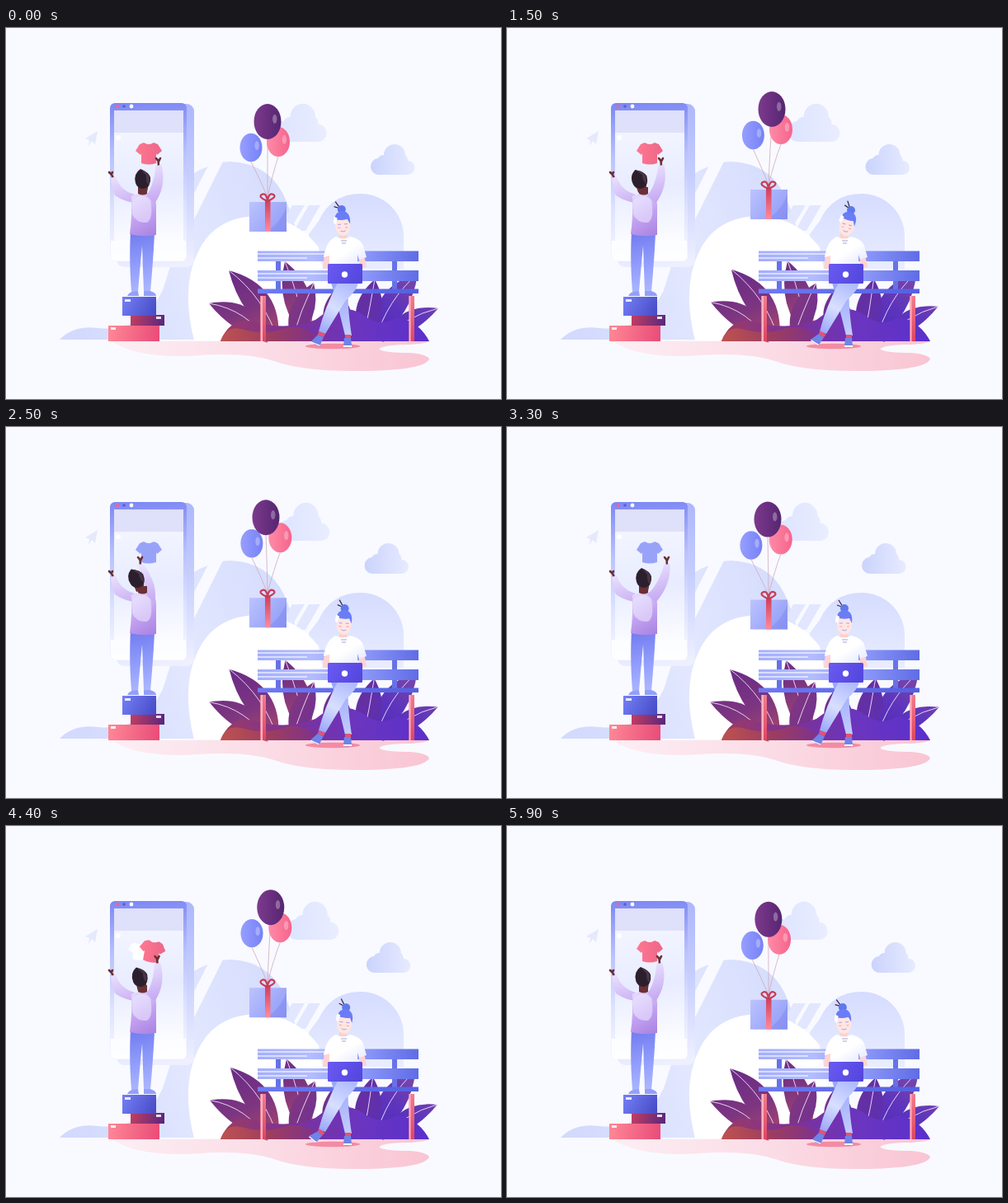
Write an HTML page that moves like this. It is 600 px wide and 450 px high and loops after 6 s.

```html
<!DOCTYPE html>
<html lang="en">
<head>
<meta charset="utf-8">
<title>Online shopping</title>
<style>
html, body { margin: 0; width: 100%; height: 100%; overflow: hidden; background: #f9faff; }
svg { display: block; width: 600px; height: 450px; }
</style>
</head>
<body>
<svg viewBox="0 0 600 450">
<defs id="defs">
  <path id="cloud" d="M10 36a10 10 0 0 1-2-20a8 8 0 0 1 7-4a13 13 0 0 1 26 0q3 2 3 7a8.500 8.500 0 0 1 0 17z"/>
  <path id="tee" d="M-6-13Q0-9 6-13L11-11L16-3L10 2L9 0V12Q0 15-9 12V0L-10 2L-16-3L-11-11z"/>
</defs>

<!-- scenery -->
<path fill="url(#hill)" d="M65 378Q82 360 112 364Q165 370 190 318L216 235V184Q244 163 272 162Q323 164 341 213L350 240L300 300L228 378z"/>
<path fill="#f9faff" d="M245 167L263 162L224 240L217 222z"/>
<path fill="url(#dome)" d="M372 292L367 250L379 234Q394 201 430 201A52 52 0 0 1 482 253V292z"/>
<path fill="#e2e7ff" d="M347 215H362L346 242H331zM367 215H381L363 246H349z"/>
<path fill="#fff" d="M228 379Q212 315 232 273Q252 229 305 228Q350 229 379 266L400 379z"/>
<use id="cloudA" href="#cloud" fill="url(#mistA)"/>
<use id="cloudB" href="#cloud" fill="url(#mistB)"/>
<path fill="#e4e9fd" d="M96 134L111 125L108 141L104 137L100 143L101 136z"/>
<path fill="url(#ground)" d="M128 380H513Q505 384 480 384Q450 386 453 390Q460 394 490 394Q512 396 513 402Q505 416 420 416Q358 416 325 404Q292 393 235 397Q160 402 128 380z"/>

<!-- phone -->
<rect x="134" y="92" width="94" height="198" rx="9" fill="url(#back)"/>
<rect x="126" y="91" width="93" height="192" rx="6" fill="url(#front)"/>
<path fill="#f3f5ff" d="M131 100H215V258H131z"/>
<path fill="url(#screen)" d="M131 127H215V258H131z"/>
<path fill="#dfe0f9" d="M131 100H215V127H131z"/>
<path fill="#fff" d="M127 258H218V276Q218 282 211 282H134Q127 282 127 276z" opacity=".85"/>
<circle cx="135" cy="95" r="2.2" fill="#e56a9b"/><circle cx="143" cy="95" r="1.8" fill="#5a5fd0"/>
<circle cx="152" cy="95" r="2.4" fill="#fff"/><circle cx="136" cy="133" r="3" fill="#fff"/>
<use id="teeGhost" href="#tee" fill="#fff"/>
<use id="teePink" href="#tee" fill="url(#rose)"/>
<use id="teeBlue" href="#tee" fill="#98a3f8"/>

<!-- boxes -->
<path fill="url(#boxMid)" d="M151 348H192V361H151z"/>
<path fill="url(#boxLow)" d="M124 361H186V380H124z"/>
<path fill="url(#boxTop)" d="M141 326H182V349H141z"/>
<path fill="#fff" d="M144 329h7v3h-7zM127 363h6v3h-6zM182 350h6v3h-6z" opacity=".85"/>

<!-- man -->
<path fill="url(#trousers)" d="M151 248H180Q179 275 175 320H167L165 264Q162 295 160 320H152Q149 280 151 248z"/>
<path fill="#93a0fa" d="M147 325Q149 319 160 319L161 325zM167 319H175Q182 321 182 325H167z"/>
<path stroke="#6b3036" stroke-width="2.6" stroke-linecap="round" fill="none" d="M130 182L127 176M127 177L125 175M128 177L129 175"/>
<path fill="url(#sleeve)" d="M127 182L133 180Q138 197 156 202L154 212Q140 209 132 203Q128 195 127 182z"/>
<path id="hand" stroke="#6b3036" stroke-width="2.6" stroke-linecap="round" fill="none"/>
<path fill="url(#jumper)" d="M152 204Q164 198 177 201Q183 206 182 222V251Q166 254 150 250Q153 228 152 204z"/>
<path id="arm" fill="url(#sleeve)"/>
<path fill="#ece6ff" opacity=".6" d="M153 209Q166 199 175 209Q179 231 171 236Q158 237 153 226z"/>
<path fill="#6b3036" d="M160 193H171V201Q166 204 160 201z"/>
<g id="manHead">
  <path fill="#6b3036" d="M160 189H173L171 199H161z"/>
  <path fill="#2c1f2d" d="M157 188Q154 177 163 171Q173 175 175 181Q176 193 167 195Q159 195 157 188z"/>
  <path fill="#493548" d="M164 172Q173 175 174 182L173 191Q169 186 170 179z"/>
</g>

<!-- balloons -->
<g id="strings" fill="none" stroke="#cfaabf" stroke-width=".8"></g>
<g id="balloons"></g>
<g id="gift">
  <path fill="url(#parcel)" d="M295 211H340V247H295z"/>
  <path fill="#7179e8" opacity=".3" d="M340 216Q333 237 315 247H340z"/>
  <path fill="url(#ribbon)" d="M314 209H320.500V247H314z"/>
  <path fill="none" stroke="#c63c59" stroke-width="2.2" d="M317 210Q305 205 310 202Q315 199 317 209Q319 199 324 202Q329 205 317 210"/>
</g>

<!-- bush and bench -->
<g id="leaves"></g>
<path fill="url(#waveA)" d="M260 380Q272 350 300 356Q340 368 375 354Q404 330 433 348Q453 364 474 351Q500 355 513 380z"/>
<path fill="url(#waveB)" d="M260 380Q266 361 285 365Q315 374 342 363Q366 361 384 380z"/>
<path fill="#6672e6" d="M327 283h6v35h-6zM468 281h6v38h-6z"/>
<path fill="url(#slat)" d="M305 270.500H500V283H305zM305 294H500V307H305z"/>
<path stroke="#fff" stroke-width="1.500" opacity=".75" d="M305 274H390M305 279H365M305 298H390M305 303H365"/>
<path fill="url(#seat)" d="M305 316.500H500V322H305z"/>
<path fill="url(#leg)" d="M308.500 325h6.500V380h-6.500zM488.500 325h6.500V380h-6.500z"/>
<path fill="#ffb2bd" d="M308.500 325h2.500V380h-2.500zM488.500 325h2V380h-2z"/>

<!-- woman -->
<ellipse cx="396" cy="386" rx="33" ry="3.300" fill="#ef6e8b" opacity=".7"/>
<path fill="url(#denim)" d="M394 309H415Q413 335 419 373H411Q402 335 394 309z"/>
<path fill="url(#jeans)" d="M402 309H427Q425 319 412 330L387 371L379 368Q386 340 402 309z"/>
<path fill="#e8526f" d="M411 372H418V376H411z"/>
<path fill="#6f83e8" d="M410 376H418L419 386Q414 389 409 386z"/>
<path fill="#fff" d="M409 385H419V387H409z"/>
<g id="foot">
  <path fill="#e8526f" d="M379 368L387 371L385 375L378 372z"/>
  <path fill="#6f83e8" d="M378 372L385 375L381 384Q375 386 370 380z"/>
  <path stroke="#fff" stroke-width="1.200" d="M370 381L380 385"/>
</g>
<path fill="#ffd3d2" d="M386 274H392V292H384zM428 275H434L437 290L428 293z"/>
<path fill="#ffd0cb" d="M404 246H413V257H404z"/>
<path fill="url(#blouse)" d="M400 253Q409 258 417 253Q430 256 433 264L437 278L428 281L426 275V290H392V276L385 278Q388 258 400 253z"/>
<path stroke="#8790c8" stroke-width=".8" d="M406 258H413M407 261H412"/>
<g id="womanHead">
  <path stroke="#33294f" stroke-width="1.300" d="M402 210L407 218M400 216L408 219"/>
  <circle cx="409" cy="220" r="5" fill="#5f78ee"/>
  <path fill="#ffe6e2" d="M400 232Q409 226 418 232V241Q416 252 409 252Q401 251 400 241z"/>
  <path fill="#6a7df6" d="M400 231Q400 223 409 222Q420 223 418 238L415 232Q407 234 400 231z"/>
  <path fill="#fff" d="M399 228L403 230L401 238L398 236z"/>
  <path fill="none" stroke="#a597ee" stroke-width=".9" d="M403 238h4M411 238h4M406 246q3 2 6 0"/>
  <path stroke="#ffa3b3" stroke-width="1.200" d="M403 242h3M412 242h3"/>
</g>
<rect x="390" y="286" width="42" height="24" rx="1.500" fill="url(#laptop)"/>
<circle cx="410.500" cy="299" r="3.700" fill="#fff"/>
</svg>

<script>
const $ = id => document.getElementById(id);
const set = (id, attrs) => { for (const k in attrs) $(id).setAttribute(k, attrs[k]); };

// Stage coordinates of each gradient line, then its colours; no line means left to right.
const gradients = {
  hill: ['70 300 345 200', '#d3dafd', '#e3e8ff', '#d5dcfd'],
  dome: ['430 201 430 292', '#d5dcff', '#e9edff'],
  mistA: ['', '#dde4ff', '#e9edff'],
  mistB: ['', '#cad3fd', '#e7ebff'],
  ground: ['128 380 510 390', '#fdeef4', '#fbdce6', '#f9c5d3'],
  back: ['150 92 190 290', '#a9b3fb', '#c6cefd', '#eef0ff'],
  front: ['150 91 160 283', '#7d88f5', '#b9c2fc', '#dde2ff', '#f8f9ff'],
  screen: ['170 127 180 258', '#f2f4ff', '#e8ecff', '#fbfcff'],
  rose: ['', '#ff7890', '#ec6689'],
  boxTop: ['141 326 182 349', '#7580f6', '#4549c4'],
  boxMid: ['151 350 192 360', '#c33d62', '#56277f'],
  boxLow: ['124 370 186 380', '#ff8796', '#e84b78'],
  trousers: ['152 250 170 320', '#737df0', '#8f9bfb', '#adb7ff'],
  jumper: ['152 203 180 252', '#e7ddff', '#c3a2f1', '#a982e2'],
  sleeve: ['160 165 175 214', '#eee9ff', '#c4a6f2'],
  parcel: ['295 211 340 247', '#bcc3ff', '#8f99f5'],
  ribbon: ['317 209 317 247', '#d13e5c', '#ff8b9a'],
  leafDark: ['290 290 330 380', '#6a2c86', '#7d3580', '#b04a66'],
  leafMid: ['330 310 470 370', '#8a3a76', '#6a2f98', '#5a30b8'],
  leafLight: ['500 300 450 380', '#7d4aa2', '#5d34bd', '#4f2bb5'],
  waveA: ['260 365 513 365', '#9c3b62', '#7d3196', '#6a35c0', '#5a30cc'],
  waveB: ['260 370 384 370', '#bd5250', '#9c3d60', '#7a3090'],
  slat: ['305 0 500 0', '#a3aefd', '#b3bcff', '#8b97f8', '#5f6ce6'],
  seat: ['305 0 500 0', '#6e7af4', '#5560e0'],
  leg: ['0 325 0 380', '#f17c8e', '#df4564'],
  jeans: ['415 310 382 370', '#b0bcff', '#d8dfff', '#98a6fb'],
  denim: ['400 310 415 373', '#98a6f8', '#c3cdff'],
  blouse: ['400 253 423 290', '#fff', '#fff', '#e6eaff'],
  laptop: ['390 286 432 310', '#6a5af2', '#5245dc'],
  plum: ['', '#7c3a8c', '#6a2f80', '#552670'],
  sky: ['', '#979fff', '#7681f6'],
  coral: ['', '#ff8ba6', '#f5648d']
};
$('defs').innerHTML += Object.entries(gradients).map(([id, [line, ...colors]]) => {
  const [x1, y1, x2, y2] = line.split(' ');
  const place = line && `gradientUnits="userSpaceOnUse" x1="${x1}" y1="${y1}" x2="${x2}" y2="${y2}"`;
  const stops = colors.map((c, i) => `<stop offset="${i / (colors.length - 1)}" stop-color="${c}"/>`);
  return `<linearGradient id="${id}" ${place}>${stops.join('')}</linearGradient>`;
}).join('');

// Leaf: base, tip, bulge to the right and left of the midrib, fill.
const leafShapes = [
  [365, 378, 338, 283, 36, 28, 'leafDark'], [448, 378, 499, 298, 22, 42, 'leafLight'],
  [346, 380, 373, 309, 26, 30, 'leafMid'], [432, 380, 447, 305, 32, 30, 'leafMid'],
  [330, 380, 270, 294, 44, 20, 'leafDark'], [405, 380, 398, 318, 34, 34, 'leafMid'],
  [318, 382, 246, 334, 42, 14, 'leafDark'], [455, 381, 524, 340, 14, 32, 'leafLight']
];
const drawLeaf = ([bx, by, tx, ty, right, left, fill]) => {
  const length = Math.hypot(tx - bx, ty - by);
  const nx = (by - ty) / length, ny = (tx - bx) / length;
  const mx = (bx + tx) / 2, my = (by + ty) / 2;
  const side = k => `${mx + nx * k} ${my + ny * k}`;
  return `<g class="leaf" data-base="${bx} ${by}">
    <path fill="url(#${fill})" d="M${bx} ${by}Q${side(right)} ${tx} ${ty}Q${side(-left)} ${bx} ${by}z"/>
    <path fill="none" stroke="#f3e2fb" stroke-width=".9" d="M${bx} ${by}Q${side((right - left) * .7)} ${tx} ${ty}"/></g>`;
};
$('leaves').innerHTML = leafShapes.map(drawLeaf).join('');
const leaves = [...document.querySelectorAll('.leaf')];

// Sway: centre x, cosine, sine and double-rate cosine; then y, radii, fill.
const balloons = [
  { sway: [332.6, -1, .7, -1.6], y: 138, rx: 14, ry: 18, fill: 'coral' },
  { sway: [297.2, -.7, -1.5, .5], y: 145, rx: 13.5, ry: 17.2, fill: 'sky' },
  { sway: [317, -2, 0, 2], y: 113.5, rx: 16.5, ry: 21.5, fill: 'plum' }
];
$('balloons').innerHTML = balloons.map(({ rx, ry, fill }, i) => `<g id="balloon${i}">
  <ellipse rx="${rx}" ry="${ry}" fill="url(#${fill})"/>
  <ellipse cx="${rx * .53}" cy="${-ry * .15}" rx="2.7" ry="5.5" fill="#fff" opacity=".3"/></g>`).join('');
$('strings').innerHTML = balloons.map((_, i) => `<path id="string${i}"/>`).join('');

const LOOP = 6000, CYCLE = 3000;
const wave = (t, period) => Math.cos(2 * Math.PI * t / period);
const ramp = (t, a, b) => {
  const p = Math.min(1, Math.max(0, (t - a) / (b - a)));
  return p * p * (3 - 2 * p);
};
// Eased track through [time, value] pairs.
const track = (t, keys) => keys.reduce((v, [time, value], i) =>
  i ? v + (value - keys[i - 1][1]) * ramp(t, keys[i - 1][0], time) : value, 0);

// The old shirt whitens and slides away while the new one swings in.
function swapTees(t) {
  const firstHalf = t < CYCLE;
  const [oldTee, newTee] = firstHalf ? ['teePink', 'teeBlue'] : ['teeBlue', 'teePink'];
  const start = firstHalf ? 1550 : 4200;
  const p = ramp(t, start, start + 400);
  const leaving = `translate(${173 - 24 * p} 152) scale(${1 - .4 * p})`;
  set(oldTee, { transform: leaving, opacity: 1 - ramp(p, 0, .4) });
  set('teeGhost', { transform: leaving, opacity: ramp(p, 0, .3) * (1 - ramp(p, .6, 1)) });
  set(newTee, { transform: `translate(${181 - 8 * p} 152) rotate(${20 * (1 - p)})`, opacity: ramp(p, .1, .5) });
}

function drawMan(t) {
  const phase = t % CYCLE;
  const x = track(phase, [[0, 185], [300, 194], [800, 185], [1350, 183], [1650, 191], [2400, 163], [2600, 163], [2900, 185]]);
  const ex = 186 + (x - 185) * .45, ey = 188, y = 160;
  set('arm', { d: `M170 203Q${ex - 7} ${ey + 4} ${x - 3.5} ${y + 7}L${x + 3.5} ${y + 6}Q${ex + 9} ${ey + 4} 180 213z` });
  set('hand', { d: `M${x} ${y + 8}L${x - .5} ${y}M${x} ${y + 2}L${x - 3} ${y - 2}M${x} ${y + 2}L${x + 2} ${y - 2}` });

  const lean = track(phase, [[0, 0], [300, 0], [800, 4], [1800, -7], [2500, -7], [3000, 0]]);
  set('manHead', { transform: `translate(${lean} 0) rotate(${lean * 2.5} 166 186)` });
  swapTees(t);
}

function drawBalloons(t) {
  const lift = 7.5 * (wave(t, CYCLE) - 1);
  set('gift', { transform: `translate(0 ${lift})` });
  balloons.forEach(({ sway: [x, c, s, d], y, ry }, i) => {
    const bx = x + c * wave(t, CYCLE) + s * wave(t - CYCLE / 4, CYCLE) + d * wave(t, CYCLE / 2);
    const by = y + lift;
    set('balloon' + i, { transform: `translate(${bx} ${by})` });
    set('string' + i, { d: `M${bx} ${by + ry}Q${(bx + 317) / 2} ${by + ry + 20} 317 ${205 + lift}` });
  });
}

function draw(t) {
  drawMan(t);
  drawBalloons(t);
  set('cloudA', { transform: `translate(${334.5 - 7.5 * wave(t, CYCLE)} 93) scale(1.17 1.25)` });
  set('cloudB', { transform: `translate(${435.5 + 7.5 * wave(t, 2000)} 142)` });
  leaves.forEach((leaf, i) => {
    const angle = (i % 2 ? .9 : -.6) * (wave(t, CYCLE) - 1);
    leaf.setAttribute('transform', `rotate(${angle} ${leaf.dataset.base})`);
  });
  const nod = track(t, [[0, -4], [800, 15], [1500, 15], [2500, 3], [3300, 0], [4400, 6], [6000, -4]]);
  set('womanHead', { transform: `rotate(${nod} 409 251)` });
  const tap = track(t, [[0, 0], [800, 8], [1500, 10], [2500, 3], [3300, 0], [4400, 17], [6000, 0]]);
  set('foot', { transform: `rotate(${tap} 383 370)` });
}

// The picture advances ten times a second.
function tick() {
  draw(Math.floor(performance.now() % LOOP / 100) * 100);
  requestAnimationFrame(tick);
}
tick();
</script>
</body>
</html>
```
